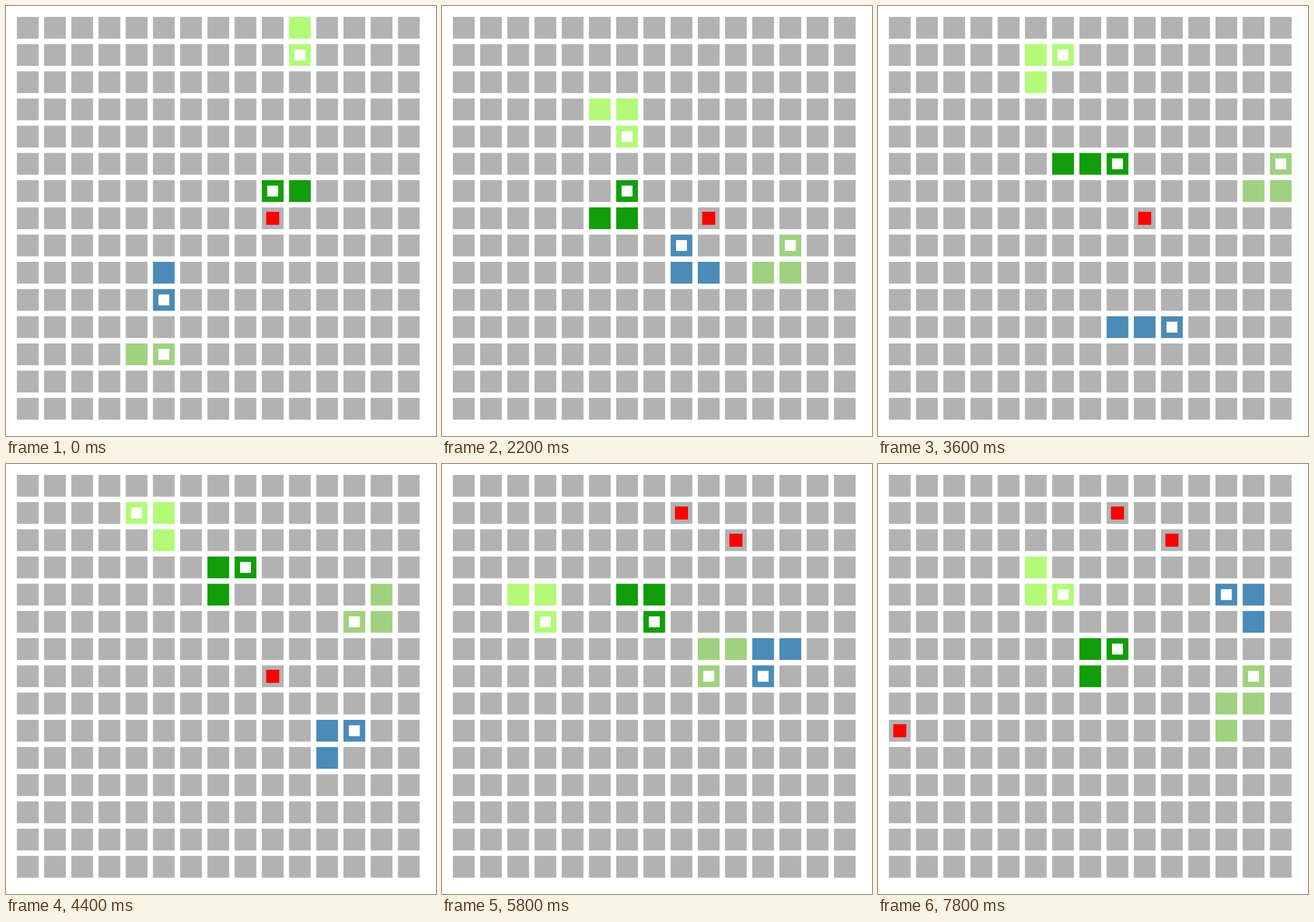
Animation of 748 by 748 pixels, one loop 8000 ms. Source, as an HTML page:

```html
<!DOCTYPE html>
<html lang="en">
<head>
<meta charset="utf-8">
<title>Snakes</title>
<style>
  html, body { margin: 0; width: 100%; height: 100%; overflow: hidden; background: #fff; }
  svg { display: block; width: 100vw; height: 100vh; }
</style>
</head>
<body>
<svg viewBox="0 0 748 748"></svg>
<script>
const SIZE = 15, STEP = 200, STEPS = 40;
const UNIT = 748 / 79, PITCH = 5 * UNIT, CELL = 4 * UNIT;
const EMPTY = '#b2b2b2';
const MOVES = { L: [-1, 0], R: [1, 0], U: [0, -1], D: [0, 1] };

// Each snake starts at its tail and takes one move per step.
const snakes = [
  { color: '#b2fa78', start: [10, 0], moves: 'D LLLD LLLDR RDLUR ULURD LULLD DLDRD DRRRU UULDR' },
  { color: '#129e0a', start: [10, 6], moves: 'L LDLL LULDR RULDR UURRU LURUL LDDRD DRDDL LURUR' },
  { color: '#4b8bb7', start: [5, 9], moves: 'D RRRU URRDL LURDL DDRRR UURRU UULLD DDRRU UUUUL' },
  { color: '#a0d180', start: [4, 12], moves: 'R RRUR RRURU RURUL URRUU LDLLU LDDLD DDDRR RUURU', growsAt: 30 }
];

// Food is visible from one step up to, not including, another.
const foods = [
  { at: [9, 7], from: 0, to: 29 },
  { at: [10, 2], from: 26, to: STEPS },
  { at: [8, 1], from: 29, to: STEPS },
  { at: [0, 9], from: 38, to: STEPS }
];

const svg = document.querySelector('svg');

function addSquare([col, row], scale, fill) {
  const rect = document.createElementNS(svg.namespaceURI, 'rect');
  const inset = CELL * (1 - scale) / 2;
  const attrs = { width: CELL * scale, height: CELL * scale, fill };
  for (const name in attrs) rect.setAttribute(name, attrs[name]);
  svg.append(rect);
  const place = ([c, r]) => {
    rect.setAttribute('x', 2 * UNIT + c * PITCH + inset);
    rect.setAttribute('y', 2 * UNIT + r * PITCH + inset);
  };
  place([col, row]);
  return { rect, place };
}

const cells = Array.from({ length: SIZE * SIZE }, (_, i) =>
  addSquare([i % SIZE, Math.floor(i / SIZE)], 1, EMPTY).rect);

for (const food of foods) food.rect = addSquare(food.at, 0.6, '#f00').rect;

for (const snake of snakes) {
  snake.path = [snake.start];
  for (const move of snake.moves.replace(/ /g, '')) {
    const [col, row] = snake.path[snake.path.length - 1];
    const [dx, dy] = MOVES[move];
    snake.path.push([col + dx, row + dy]);
  }
  snake.eye = addSquare(snake.start, 0.5, '#fff');
}

function draw(step) {
  const fills = Array(cells.length).fill(EMPTY);
  for (const { path, color, growsAt, eye } of snakes) {
    const head = step + 1;
    const length = step >= growsAt ? 4 : 3;
    const body = path.slice(Math.max(0, head + 1 - length), head + 1);
    for (const [col, row] of body) fills[row * SIZE + col] = color;
    eye.place(path[head]);
  }
  cells.forEach((cell, i) => cell.setAttribute('fill', fills[i]));
  for (const { rect, from, to } of foods) {
    rect.setAttribute('visibility', step >= from && step < to ? 'visible' : 'hidden');
  }
}

const begin = performance.now();
let shown = -1;

function tick() {
  const step = Math.floor((performance.now() - begin) / STEP) % STEPS;
  if (step !== shown) draw(shown = step);
  requestAnimationFrame(tick);
}
tick();
</script>
</body>
</html>
```
